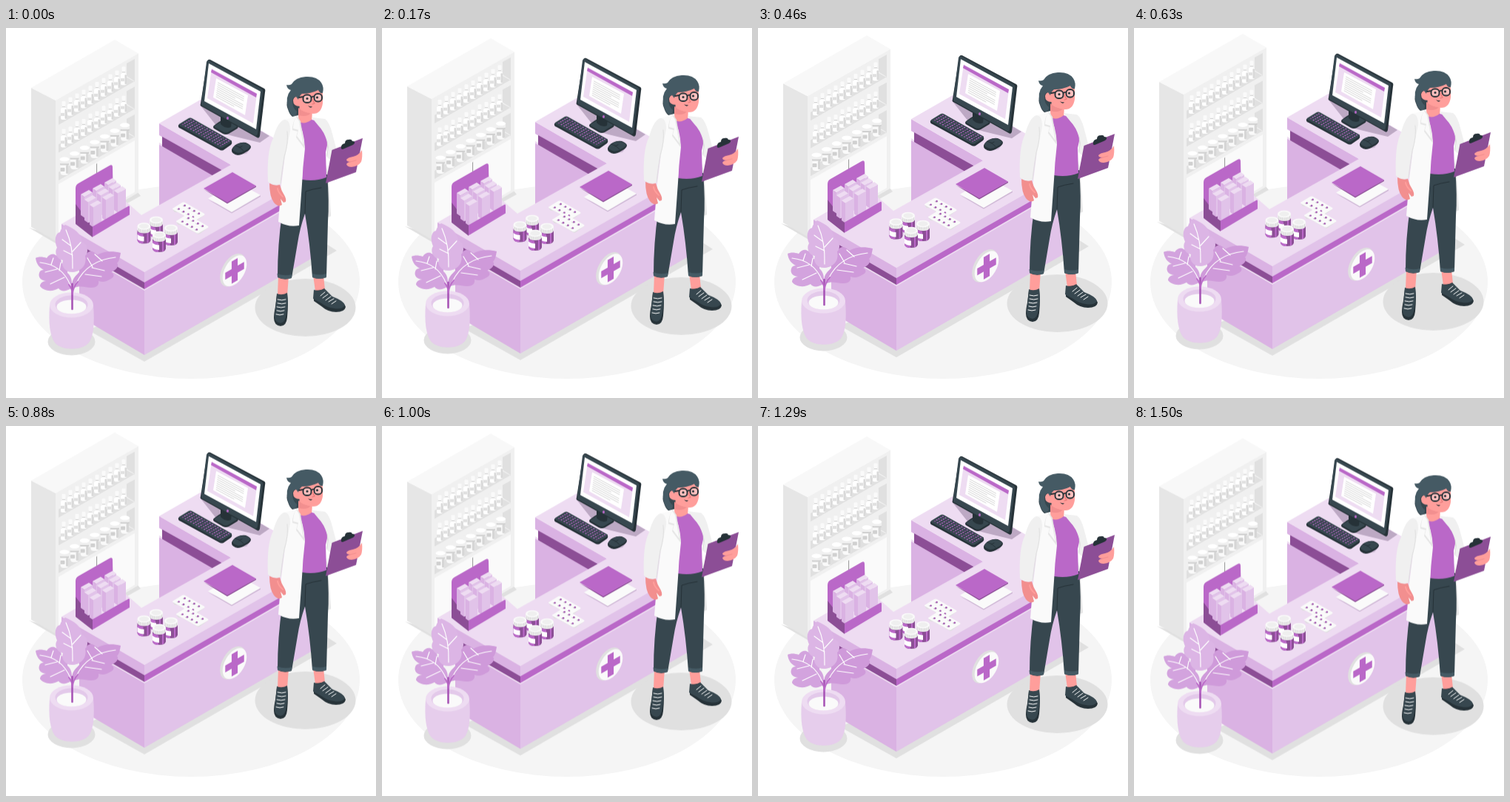
Animation, 500 px wide and 500 px high, one loop 1540 ms. Source, as an HTML page:

```html
<!DOCTYPE html>
<html lang="en">
<head>
<meta charset="utf-8">
<title>Pharmacy</title>
<style>
html, body { margin: 0; width: 100%; height: 100%; overflow: hidden; background: #fff; }
svg { display: block; width: 100%; height: 100%; }
.p { fill: #ba68c8; } .d { fill: #8c4e96; }
.t1 { fill: #eedcf2; } .t2 { fill: #e1c3e9; } .t3 { fill: #dab2e3; }
.w { fill: #fff; } .g1 { fill: #fafafa; } .g2 { fill: #f0f0f0; } .g3 { fill: #e0e0e0; }
.n { fill: #37474f; } .k { fill: #263238; } .h { fill: #455a64; }
.s { fill: #ff9e9b; } .s2 { fill: #f28f8f; }
.ln { fill: none; stroke-linecap: round; stroke-linejoin: round; }
</style>
</head>
<body>
<svg viewBox="0 0 500 500">
<ellipse cx="250" cy="343" rx="228" ry="131" fill="#f5f5f5"/>
<g id="scene">
  <!-- shadows -->
  <path class="g3" d="M31 270l36 21 115-64-5-6-110 60z"/>
  <path class="g3" d="M110 408l77 43 260-150-14-9z"/>
  <ellipse class="g3" cx="404.500" cy="378" rx="68" ry="39"/>
  <ellipse class="g3" cx="88.500" cy="424" rx="32" ry="18.500"/>

  <!-- shelf -->
  <path fill="#e6e6e6" d="M34 81l33 17v190l-33-19z"/>
  <path fill="#f8f8f8" d="M34 81l113-65 32 18.500-112 63.500z"/>
  <path class="g2" d="M67 98l112-63.500v188l-112 65.500z"/>
  <g id="shelf"></g>
  <path class="g1" d="M71 211l103-59v70l-103 60z"/>
  <path class="ln" stroke="#e6e6e6" d="M123 183v68"/>
  <path class="ln" stroke="#8a8a8a" stroke-width=".8" d="M122.500 184v17"/>

  <!-- back arm of the counter -->
  <path class="t3" d="M207 157l100 56v30l-100 5z"/>
  <path class="t1" d="M207 155l75 43h-4l-71-40z"/>
  <path class="t3" d="M207 129l97 56v8l-10 5-87-53z"/>
  <path class="d" d="M211 147l82 46-13 7-69-40z"/>
  <path class="t1" d="M207 129l61-35 132 77v39l-213 120-112-65 24-14 52-26 32 28 121-68z"/>

  <!-- front of the counter -->
  <path class="t3" d="M99 301l88 52v89l-88-52z"/>
  <path class="t2" d="M187 353l227-131v89l-227 131z"/>
  <path class="t1" d="M187 352l227-131v3l-227 131-88-51v-3z"/>
  <path class="d" d="M85 284l102 58v11l-102-59z"/>
  <path class="p" d="M187 342l220-127v11l-220 127z"/>
  <path class="t3" d="M75 265l112 65v14l-112-65z"/>
  <path class="t2" d="M187 330l213-122v14l-213 122z"/>
  <g transform="matrix(.866 -.5 0 1 306.500 327.300)"><circle class="g3" r="20"/></g>
  <g transform="matrix(.866 -.5 0 1 309 328.300)">
    <circle class="g1" r="18.800"/>
    <path class="p" d="M-4.700-15h9.400v10.300h10v9.400h-10v10.300h-9.400v-10.300h-10v-9.400h10z"/>
  </g>

  <!-- display box -->
  <path class="p" d="M94 217q0-5 4-7l42-24q4-2 4 2l1 49-38 25-13-18z"/>
  <path class="d" d="M94 238l23 30v15l-23-18z"/>
  <g id="packs"></g>
  <path class="p" d="M117 268.500l49-28q1 0 1 2v10l-50 30z"/>

  <!-- monitor -->
  <path fill="#bda9c4" d="M262 104l14-5 80 47-13 9-37-9-14-4z"/>
  <path class="k" d="M281 132q13-10 18-10l14 10q2 3-2 5l-10 6q-4 2-8 0l-12-7q-2-2 0-4z"/>
  <path class="n" d="M282 132l16-9 14 8q2 2-2 4l-10 6q-3 1-6 0l-12-7q-1-1 0-2z"/>
  <path class="k" d="M290 117l15 8-1 9q-7 3-14-4z"/>
  <path class="k" d="M272 45q1-3 4-2l73 39q2 1 1 5l-7 59q-1 4-4 2l-75-42q-2-1-1-4z"/>
  <path class="n" d="M271 46q1-3 4-2l70 38q3 2 2 5l-7 56q-1 4-4 2l-71-40q-2-1-1-4z"/>
  <path class="w" d="M274 48l70 38-6 51-70-38z"/>
  <path class="t1" d="M278 55l61 34-5 40-62-34z"/>
  <path class="p" d="M278 56l61 33-1 5-61-34z"/>
  <path class="w" d="M284 68l43 23-4 27-43-24z"/>
  <g id="text" class="ln" stroke="#d3d3d3" stroke-width=".9"></g>
  <ellipse class="p" cx="299.500" cy="122" rx="1.500" ry="2"/>

  <!-- keyboard and mouse -->
  <path class="k" d="M233 131q-1 4 3 5l53 29q3 1 5 0l10-7q2-2 1-5z"/>
  <path class="n" d="M234 130l13-8q2-1 4 0l53 30q2 1 0 3l-11 7q-2 1-5 0l-54-30q-1-1 0-2z"/>
  <g id="keys"></g>
  <path fill="#cdb9d4" d="M309 172l16-2 6-8-8-3z"/>
  <path class="k" d="M305 166q0-5 7-9 6-3 12-2 7 3 7 6-1 4-7 7-6 4-11 4-8-2-8-6z"/>
  <path class="n" d="M306 164q1-4 7-7 6-3 11-1 5 2 6 4-1 3-7 6-5 3-9 3-7-2-8-5z"/>
  <path class="ln" stroke="#263238" d="M310 159q6 1 11 7M315 162l4-2"/>

  <!-- papers, blisters, jars -->
  <path fill="#cfb8d6" d="M273 232l32 18.500 39-22.500v-2l-39 20z"/>
  <path class="g1" d="M273 230.500l39-22 32 17.500-39 23z"/>
  <path class="d" d="M267 218l32 19.500 39-22.500v-1.500l-39 21z"/>
  <path class="p" d="M267 217l39-22 32 18.500-39 22.500z"/>
  <g id="blisters"></g>
  <g id="jars"></g>

  <!-- plant -->
  <path fill="#e6cdec" d="M59 375C57 400 60 416 65 424c8 13 40 13 48 0 5-8 7-24 5-49z"/>
  <ellipse fill="#eedcf2" cx="88.500" cy="374.500" rx="29.500" ry="17"/>
  <ellipse fill="#e3c9ea" cx="88.500" cy="374" rx="22" ry="12.500"/>
  <ellipse fill="#fafafa" cx="88.500" cy="377" rx="20" ry="9.500"/>
  <path fill="#cf9ada" d="M91 352C86 340 96 334 99 330c-1-8 2-11 6-12 0-9 3-15 9-16 4 0 7 2 9 5 8-5 20-6 32-3-1 6-2 11-5 14 3 3 0 9-8 12 5 3 5 7-2 10-5 3-9 4-15 2 1 6-3 9-10 9-8 0-15-4-24 1z"/>
  <path fill="#d3a3de" d="M88 352c-8 5-14 4-17 0-8 5-20 4-25-3 0-4 4-7 8-7-7-1-11-5-9-11 1-3 3-4 6-4-6-3-10-8-11-16 4-2 9-2 15 0 4-6 9-6 12-4 5 2 8 6 8 11 8 1 9 6 8 13 6 5 7 13 5 21z"/>
  <path fill="#dcb5e5" d="M91 330c-11 1-17-8-14-16-9-1-12-12-8-17-4-9-3-19 4-21 1-4 3-7 7-10 12 5 22 12 23 23 8 3 9 16 4 19 3 13-6 21-16 22z"/>
  <path class="ln" stroke="#fff" stroke-width="1.200" d="M81 273q10 22 9 52M87 294l-11-8M90 307l-12-6M90 302l11-12M46 317q30 3 41 31M61 320l3-9M72 328l2-11M69 326l-16 4M79 337l-19 9M148 310q-38 4-53 35M130 315l-10-9M117 323l-7-12M116 324l17 4M107 333l22 3"/>
  <path class="ln" stroke="#a855b6" stroke-width="2.600" d="M89.500 380v-34"/>
  <path class="ln" stroke="#ba68c8" stroke-width="1.800" d="M90 360q-1-8-5-13M90 359q1-9 7-16"/>

  <!-- person -->
  <path class="s" d="M368 335h14l-2 27q-6 4-13-1zM415 334h14l2 20q-6 5-13 2z"/>
  <path class="k" d="M366 361q6 3 14-2l1 12q0 9-1 20-1 12-9 12-9-1-9-11 0-6 2-15z"/>
  <path class="n" d="M366 359q7 3 14-1l1 13-2 15q-2 13-8 13-8-1-8-9z"/>
  <path class="k" d="M416 355q8 0 14-2l10 10q17 7 19 14-1 7-13 7-11 0-20-8l-10-7z"/>
  <path class="n" d="M416 354q8 3 14-2l11 11q16 6 17 12-4 6-15 4-9-1-17-7l-11-6z"/>
  <path class="ln" stroke="#fff" d="M367 367q6 2 11 0M367 372q6 2 11 0M366 377q6 2 11 0M366 382q5 2 10 0M365 387q5 2 10 0M425 362l6-5M428 365l7-5M432 368l7-5M436 370l7-4M440 373l6-4"/>
  <path fill="#e6e6e6" d="M427 170l8 25 4 59q-2 3-8 0l-6-60z"/>
  <path class="n" d="M399 204l35-6q3 38 1 64l-2 75q-10 4-19 0-3-45-10-86-7 20-10 40l-8 47q-10 4-19-1 0-45 6-85z"/>
  <path class="ln" stroke="#263238" d="M404 251l1-30q8-3 21-5"/>
  <path class="h" d="M366.500 332q10 4 20 1l-1 5q-9 3-18.500-1zM414 332q10 3 19 0v5q-9 4-19 0z"/>
  <path class="s" d="M394 104l20 6-1 21q-9 5-17 1z"/>
  <path class="p" d="M396 127q8 4 17-3l13 3q8 9 9 24-1 10-3 17l1 34q-15 6-33 3l2-42z"/>
  <path class="g2" d="M413 121l18 2q6 4 10 20l5 19-8 16-5-4q2-11 1-20-4-14-12-22z"/>
  <path class="g3" d="M433 147l3 14-2 13-1-2q2-12 0-25z"/>
  <path class="g1" d="M376 124l17-4q10 19 11 43-3 25-4 48l-4 56q-14 3-28-5l4-50 5-40q3-15-3-27z"/>
  <path fill="#e6e6e6" d="M393 119l5 7 6 38-12-16 2-8-7-2q0-11 6-19z"/>
  <path class="g1" d="M392 120l4 6 6 32-9-12 2-8-7-2q0-9 4-16z"/>
  <path class="g2" d="M376 124q-9 3-15 25-9 18-7 59 9 7 17 3 1-23 6-37l7-35q0-15-8-15z"/>
  <path class="ln" stroke="#e0e0e0" d="M380 140q2 15-4 34l-5 36"/>
  <path class="s2" d="M356 210q7 4 14 2 2 8 6 14 3 5 2 9l-3 1-4-5 2 8q-5 4-11-3-6-8-6-26z"/>
  <path class="ln" stroke="#ff9e9b" stroke-width="2" d="M367 217q1 6 7 11"/>
  <path class="d" d="M440.500 165l41.500-16-9 46-41 15z"/>
  <path class="k" d="M453 161q0-4 5-5 0-5 5-5 4-1 5 2 4 0 3 3l-2 2-14 6q-3 0-2-3z"/>
  <path class="s" d="M481 165q1 10-1 16-4 6-13 7-6 0-7-4 2-3 6-3-6 0-6-3 2-3 9-4 8-2 12-9z"/>
  <path class="ln" stroke="#f28f8f" d="M465 181l8-2"/>

  <!-- head -->
  <path class="n" d="M392 84q-9 2-11 12-3 8 0 14 2 7 6 10l8-2q3-16 2-30z"/>
  <path class="s2" d="M395 108q7 7 17 7-5 6-17 3z"/>
  <path class="s" d="M396 84l31-2q2 10 1 20-2 14-13 14-13-1-18-10-9 0-9-8 1-6 8-5z"/>
  <path class="h" d="M379 77q4 1 7-1 5-9 19-10 15-1 21 8 4 6 2 14-4 1-6-4-10 5-22 5-4 3-5 8l-3-4q-5 0-5 6 0 9 6 14 0 4-3 6-6 0-9-11-4-15 4-24-5-1-6-7z"/>
  <path class="ln" stroke="#263238" stroke-width="1.800" d="M396 94l6-1M412.500 94q2-2 4-1"/>
  <g fill="#ffc1bf" stroke="#263238" stroke-width="1.900">
    <rect x="401.500" y="90.500" width="11" height="10.500" rx="4.500"/>
    <rect x="416.500" y="89" width="10.500" height="10.500" rx="4.500"/>
  </g>
  <circle class="k" cx="407" cy="95.500" r="1.600"/><circle class="k" cx="420.500" cy="94" r="1.600"/>
  <path class="ln" stroke="#e57878" stroke-width="1.200" d="M414 97l3 5-3 1"/>
  <path class="k" d="M408 105q3 2 6 1-2 4-6-1z"/>
</g>
</svg>
<script>
const fill = (id, parts) => { document.getElementById(id).innerHTML = parts.join(""); };
const each = (n, fn) => Array.from({ length: n }, (_, i) => fn(i)).flat();
const path = (c, d) => `<path class="${c}" d="${d}"/>`;
const box = (f, x, y, w, h, r = 0) =>
  `<rect fill="${f}" x="${x}" y="${y}" width="${w}" height="${h}" rx="${r}"/>`;
const oval = (f, x, y, rx, ry) => `<ellipse fill="${f}" cx="${x}" cy="${y}" rx="${rx}" ry="${ry}"/>`;

// Shelf bays with bottles and jars, x and y at the foot
const bottle = (x, y, low) => [
  box("#fff", x - 4, y - 16 + low, 8, 16 - low, 2), box("#d9d9d9", x + 1.5, y - 14 + low, 2.5, 13 - low, 1),
  box("#fff", x - 2, y - 21 + low, 4, 7, 1), box("#d0d0d0", x - 2, y - 18 + low, 4, 1.2),
  box("#fafafa", x - 2.5, y - 25 + low, 5, 6, 1), box("#e0e0e0", x - 4, y - 9, 5, 4)];
const pot = (x, y) => [
  box("#fafafa", x - 5.5, y - 17, 11, 17, 4), box("#d6d6d6", x + 2, y - 14, 3.5, 12, 1.5),
  box("#d0d0d0", x - 5.5, y - 10, 6, 5, 1), box("#cfcfcf", x - 6, y - 16, 12, 2.5, 1),
  box("#f0f0f0", x - 6.5, y - 22, 13, 6.5, 2), oval("#fff", x, y - 21.5, 6.5, 3)];
fill("shelf", each(3, k => {
  const y = 101 + 37.5 * k;
  const items = k < 2
    ? each(10, i => bottle(78 + 9 * i, y + 23 - 5.2 * i, k * (i % 2) * 2))
    : each(7, i => pot(79 + 13.6 * i, y + 23 - 7.7 * i));
  return [path("g2", `M71 ${y}l103-59v30l-103 59z`), path("g3", `M163 ${y - 53}l11-6v30l-11-7z`),
    path("g3", `M71 ${y + 19}l92-53 11 6v-1l-103 59z`), ...items];
}));

// Product boxes in the display
const pack = ([x, y, h]) => [
  path("t3", `M${x} ${y}l5 3.500v${h}l-5-3.500z`),
  path("t2", `M${x + 5} ${y + 3.5}l11-6v${h}l-11 6z`),
  path("t1", `M${x} ${y}l11-6 5 3.500-11 6z`)];
fill("packs", [
  [133, 209, 26], [117, 217, 28], [101, 225, 28],
  [139, 215, 26], [123, 223, 27], [106, 232, 28],
  [146, 220, 26], [130, 229, 28], [113, 239, 27]].flatMap(pack));

fill("text", each(8, i => path("", `M${286.5 - i * .35} ${74 + i * 2.7}l${i % 4 == 3 ? "24 13" : "35 19"}`)));

fill("keys", each(5, r => each(15, c => {
  const x = 237.5 + c * 3.65 + r * 2.7, y = 130.6 + c * 2.04 - r * 1.6;
  return path((c * 3 + r * 5) % 7 ? "p" : "d", `M${x} ${y}l1.500-.9 1.500.8-1.500.9z`);
})));

const blister = (x, y) => [
  path("g3", `M${x} ${y + 1}l28 16q2 1 4 0l11-8v-2l-40-2z`),
  path("g1", `M${x} ${y}l13-8q2-1 4 0l26 15q1 1 0 2l-12 7q-2 1-4 0l-27-15z`),
  ...each(2, r => each(4, i => {
    const px = x + 8 + i * 6.4 + r * 8, py = y + i * 3.6 - r * 4.6;
    return oval("#d6d6d6", px, py + .6, 2.4, 1.7) + oval("#fff", px - .4, py - .6, 2, 1.4) +
      oval("#a355b1", px + .5, py + .6, 1.3, 1.2);
  }))];
fill("blisters", [...blister(225, 244), ...blister(230, 261)]);

const jar = ([x, y]) => [
  path("d", `M${x - 9} ${y + 5}v14q1 4.500 9 4.500t9-4.500v-14z`),
  path("p", `M${x - 9} ${y + 8}v11q1 4.500 8 4.500v-13z`),
  path("p", `M${x + 4} ${y + 8}h2v14.500h-2z`),
  path("w", `M${x - 9} ${y + 11}q3 3 9 3v6.500q-6 0-9-3z`),
  path("g2", `M${x - 9} ${y}v5.500q1 4 9 4t9-4v-5.500z`),
  ...each(7, i => box("#cfcfcf", x - 7.5 + i * 2.4, y + 3.6 - Math.abs(i - 3) * .4, .8, 5)),
  oval("#fafafa", x, y, 9, 4.8), oval("#efefef", x, y, 6.5, 3.2)];
fill("jars", [[203, 259.5], [186.5, 268], [223, 270.5], [207, 279.5]].flatMap(jar));

// Steady float: up to 720 ms, down to 1490 ms
const LOOP = 1540;
document.getElementById("scene").animate(
  [[0, 0], [720, -9.35], [1490, .65], [LOOP, 0]].map(([t, y]) => ({
    offset: t / LOOP, transform: `translateY(${y}px)`
  })),
  { duration: LOOP, iterations: Infinity, easing: "linear" });
</script>
</body>
</html>
```
